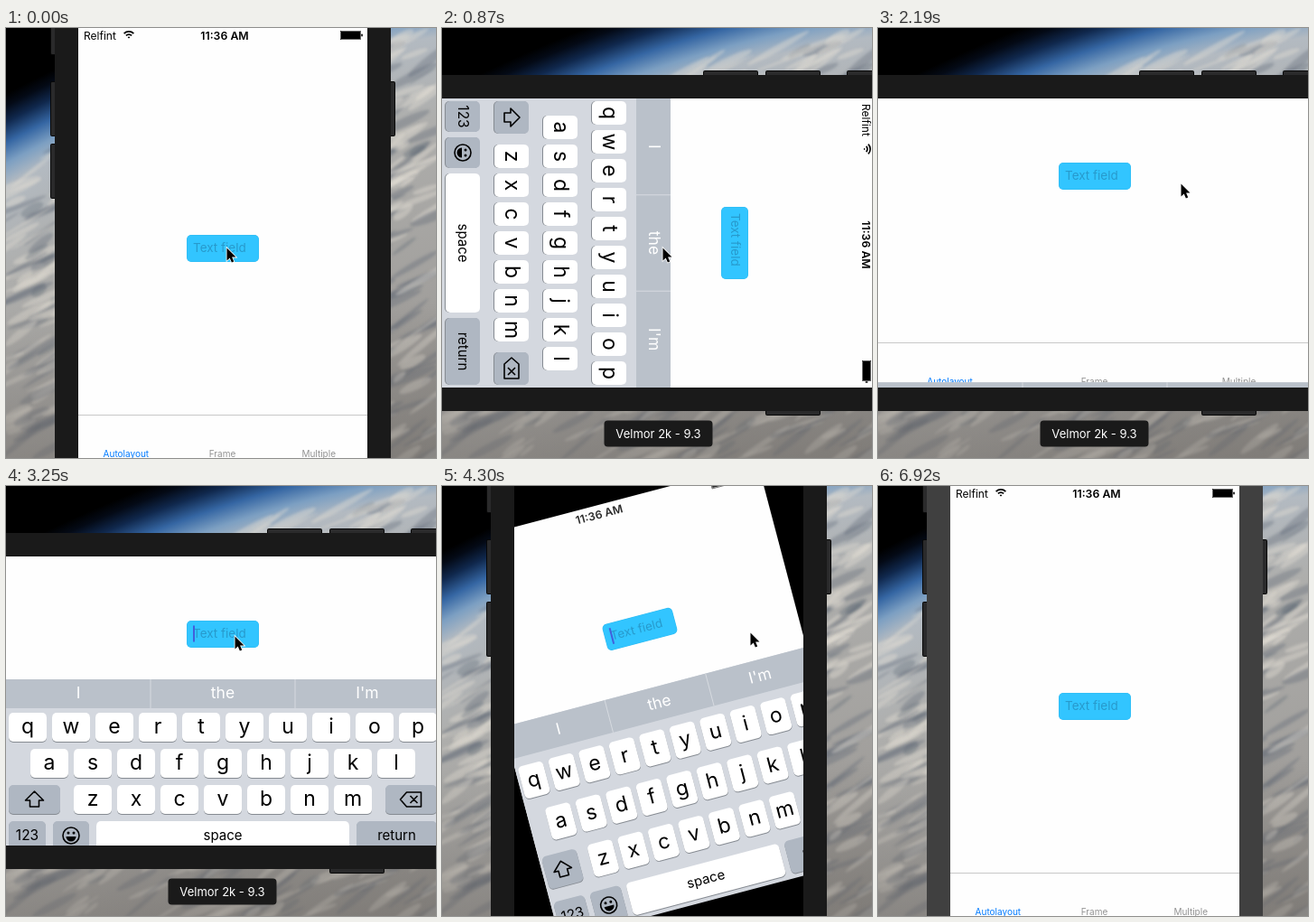
Animation, 476 px wide and 476 px high, one loop 7.02 s. Source, as an HTML page with a canvas:

```html
<!DOCTYPE html>
<html lang="en">
<head>
<meta charset="utf-8">
<title>Keyboard and rotation demo</title>
<style>
html, body { margin: 0; width: 100%; height: 100%; overflow: hidden; background: #000; }
canvas { display: block; width: 476px; height: 476px; }
</style>
</head>
<body>
<canvas id="stage" width="476" height="476"></canvas>
<script>
const SIZE = 476, LOOP = 7020;
const ctx = document.getElementById('stage').getContext('2d');
const lerp = (a, b, k) => a + (b - a) * k;
const clamp = x => Math.min(1, Math.max(0, x));
const ease = x => { x = clamp(x); return x * x * (3 - 2 * x); };

const bursts = [[180, 870, 9], [960, 1660, 9], [2190, 2810, 8], [2990, 3690, 9], [4040, 4390, 5],
  [4650, 4740, 2], [5180, 5360, 3], [5900, 6070, 3], [6240, 6330, 2]];
const updates = bursts.flatMap(([from, to, n]) =>
  Array.from({ length: n }, (_, i) => Math.floor(lerp(from, to, i / (n - 1)) / 10) * 10));
const lastUpdate = t => updates.reduce((last, u) => u <= t ? u : last, 0);

// Critically damped spring from 0 to 1.
const spring = t => { const w = Math.max(0, t) * 0.0182; return 1 - (1 + w) * Math.exp(-w); };
const keyboardShown = t => spring(t - 120) - spring(t - 1896) + spring(t - 2985) - spring(t - 4867);
const landscapeAmount = t => ease((t - 900) / 400) - ease((t - 4040) / 350);

// Pointer moves: [start, end, x, y]
const moves = [[1310, 1660, 335, 172], [2280, 2810, 253, 166], [3250, 3690, 341, 162],
  [5815, 6070, 342, 418], [6070, 6240, 364, 446]];
function pointerAt(t) {
  let x = 244, y = 243;
  for (const [from, to, toX, toY] of moves) {
    const k = ease((t - from) / (to - from));
    x = lerp(x, toX, k);
    y = lerp(y, toY, k);
  }
  return [x, y];
}

function rect(x, y, w, h, color, r = 0, g = ctx) {
  g.fillStyle = color;
  g.beginPath();
  g.roundRect(x, y, w, h, r);
  g.fill();
}
function text(str, x, y, size, color, align = 'center', weight = 400) {
  ctx.font = `${weight} ${size}px Inter, sans-serif`;
  ctx.textAlign = align;
  ctx.textBaseline = 'middle';
  ctx.fillStyle = color;
  ctx.fillText(str, x, y);
}
function trace(points, x, y) {
  ctx.beginPath();
  for (const [dx, dy] of points) ctx.lineTo(x + dx, y + dy);
  ctx.closePath();
}
function dot(x, y, r, end = 7) {
  ctx.beginPath();
  ctx.arc(x, y, r, 0, end);
  ctx.fill();
}
function at(x, y, angle, draw) {
  ctx.save();
  ctx.translate(x, y);
  ctx.rotate(angle);
  draw();
  ctx.restore();
}

// Planet edge running diagonally across the top left, clouds below it.
function makeWallpaper() {
  const canvas = document.createElement('canvas');
  canvas.width = canvas.height = SIZE;
  const g = canvas.getContext('2d');
  const cx = 670, cy = 1336, inner = 850, outer = 1430;
  const sky = g.createRadialGradient(cx, cy, inner, cx, cy, outer);
  [[850, '#8b8884'], [1050, '#a19f9c'], [1250, '#aeaeac'], [1340, '#b3bac1'], [1362, '#7c9fc2'],
    [1382, '#3566a3'], [1402, '#10284d'], [1418, '#040a16'], [1430, '#000']]
    .forEach(([r, color]) => sky.addColorStop((r - inner) / (outer - inner), color));
  rect(0, 0, SIZE, SIZE, sky, 0, g);
  let seed = 11;
  const random = () => (seed = seed * 16807 % 2147483647) / 2147483647;
  g.filter = 'blur(1.5px)';
  for (let i = 0; i < 650; i++) {
    const x = random() * SIZE, y = random() * SIZE;
    const long = 8 + random() * 32, thin = 1 + random() * 4.5, bright = random() < .58;
    if (Math.hypot(x - cx, y - cy) > 1352) continue;
    g.fillStyle = bright ? 'rgba(226,221,212,.42)' : 'rgba(84,95,110,.3)';
    g.beginPath();
    g.ellipse(x, y, long, thin, -.7 + random() * .4, 0, 7);
    g.fill();
  }
  g.filter = 'none';
  const haze = g.createLinearGradient(0, 300, 0, SIZE);
  haze.addColorStop(0, 'rgba(112,108,104,0)');
  haze.addColorStop(1, 'rgba(112,108,104,.5)');
  rect(0, 300, SIZE, 176, haze, 0, g);
  return canvas;
}
const wallpaper = makeWallpaper();

function key(x, y, w, h, label, size, special) {
  rect(x, y + 1, w, h, '#868b92', 5);
  rect(x, y, w, h, special ? '#afb7c2' : '#fff', 5);
  const cx = x + w / 2, cy = y + h / 2;
  if (typeof label === 'string') return text(label, cx, cy, size, '#000');
  ctx.strokeStyle = '#000';
  ctx.lineWidth = 1.6;
  ctx.lineJoin = 'round';
  label(cx, cy);
}
function shiftIcon(x, y) {
  trace([[0, -9], [10, 1], [5, 1], [5, 8], [-5, 8], [-5, 1], [-10, 1]], x, y);
  ctx.stroke();
}
function deleteIcon(x, y) {
  trace([[-12, 0], [-5, -8], [11, -8], [11, 8], [-5, 8]], x, y);
  ctx.moveTo(x - 1, y - 4); ctx.lineTo(x + 7, y + 4);
  ctx.moveTo(x + 7, y - 4); ctx.lineTo(x - 1, y + 4);
  ctx.stroke();
}
function smileIcon(x, y) {
  ctx.beginPath();
  ctx.arc(x, y, 9, 0, 7);
  ctx.stroke();
  ctx.fillStyle = '#000';
  dot(x - 3, y - 3, 1.5);
  dot(x + 3, y - 3, 1.5);
  dot(x, y + 1, 5.5, Math.PI);
}

// Every measure is mixed between portrait and landscape by k.
function drawKeyboard(top, width, height, k) {
  const mix = (a, b) => lerp(a, b, k);
  const pitch = width / 10, keyH = mix(38, 32), bar = mix(38, 32);
  const rowY = row => top + mix(49, 37) + row * mix(54, 40);
  rect(0, top, width, height + 1, '#d4d8df');
  rect(0, top, width, bar, '#bac1ca');
  ['I', 'the', "I'm"].forEach((word, i) => {
    text(word, width * (i + .5) / 3, top + bar / 2, 17.5, '#fff');
    if (i) rect(width * i / 3 - .5, top, 1, bar, '#d6dae0');
  });
  ['qwertyuiop', 'asdfghjkl', 'zxcvbnm'].forEach((letters, row) =>
    [...letters].forEach((c, i) =>
      key(3 + pitch * (i + [0, .5, 1.5][row]), rowY(row), pitch - 6, keyH, c, 23)));
  const side = mix(36, 57);
  key(3, rowY(2), side, keyH, shiftIcon, 0, true);
  key(width - 3 - side, rowY(2), side, keyH, deleteIcon, 0, true);
  key(3, rowY(3), mix(34, 41), keyH, '123', 15.5, true);
  key(mix(43, 52), rowY(3), mix(34, 40), keyH, smileIcon, 0, true);
  key(mix(83, 100), rowY(3), mix(154, 280), keyH, 'space', 15);
  key(mix(243, 388), rowY(3), mix(74, 89), keyH, 'return', 15, true);
}

function drawStatusBar(alpha) {
  ctx.globalAlpha = alpha;
  text('Relfint', 6, 11, 12, '#000', 'left');
  text('11:36 AM', 162, 11, 12.3, '#000', 'center', 600);
  ctx.strokeStyle = '#000';
  ctx.lineWidth = 1.7;
  for (const r of [1, 4.4, 7.6]) {
    ctx.beginPath();
    ctx.arc(56, 13.5, r, -Math.PI * .75, -Math.PI * .25);
    ctx.stroke();
  }
  ctx.lineWidth = .6;
  ctx.strokeRect(290.3, 5.3, 22.4, 9.4);
  rect(291, 6, 21, 8, '#000');
  rect(313.3, 8.5, 1.5, 3, '#000', 1);
  ctx.globalAlpha = 1;
}

function caretAlpha(t) {
  if (t >= 180 && t < 700 || t >= 2990 && t < 4650) return 1;
  return t >= 4650 && t < 4740 ? .5 : 0;
}

function drawApp(t, k) {
  const width = lerp(320, 480, k), height = lerp(480, 320, k), shown = keyboardShown(t);
  ctx.translate(-width / 2, -height / 2);
  rect(0, 0, width, height, '#fefefe');
  drawStatusBar(1 - k);

  const fieldX = width / 2 - 40, fieldY = lerp(231 - 90 * shown, 71, k);
  rect(fieldX, fieldY, 80, 30, '#2eb9f0', 5);
  rect(fieldX + .5, fieldY + .5, 79, 29, '#32c5ff', 4.5);
  text('Text field', fieldX + 7, fieldY + 15, 13.5, 'rgba(0,0,25,.22)', 'left');
  ctx.globalAlpha = caretAlpha(t);
  rect(fieldX + 7, fieldY + 5.5, 2, 18, '#4260dc');
  ctx.globalAlpha = 1;

  rect(0, height - 50, width, 1, '#c8c8c8');
  ['Autolayout', 'Frame', 'Multiple'].forEach((name, i) =>
    text(name, width * (i + .5) / 3 - .5, height - 6.5, 10, i ? '#929292' : '#007aff'));

  const keyboardH = lerp(253, 193, k);
  if (shown > .002) drawKeyboard(height - keyboardH * shown, width, keyboardH, k);
}

function drawDevice(color) {
  for (const [x, y, h] of [[-191, -300, 92], [-191, -179, 61], [-191, -110, 61], [184, -179, 61]]) {
    rect(x, y, 7, h, '#080808', 2);
    rect(x + 1, y + 1, 5, h - 2, '#2a2a2b', 1);
  }
  rect(-186, -400, 372, 800, color);
  rect(-160, -240, 320, 480, '#000');
}

function drawPointer(t) {
  if (t >= 6330) return;
  const [x, y] = pointerAt(t);
  trace([[0, 0], [0, 14], [3.2, 11], [5.4, 16], [7.7, 15], [5.6, 10.1], [10, 10.1]], x + .5, y + .5);
  ctx.lineJoin = 'miter';
  ctx.strokeStyle = '#fff';
  ctx.lineWidth = 1.6;
  ctx.stroke();
  ctx.fillStyle = '#000';
  ctx.fill();
}

function draw(now) {
  const time = now % LOOP, t = lastUpdate(time);
  const sideways = t >= 870 && t < 4040, k = landscapeAmount(t);
  const quarter = Math.PI / 2;
  ctx.drawImage(wallpaper, 0, 0);
  if (sideways) {
    rect(179.5, 434.5, 120, 29, '#1a1a1a', 4);
    text('Velmor 2k - 9.3', 239.5, 450, 13, '#fff');
  }
  at(240, 238, sideways ? quarter : 0, () => {
    drawDevice(time >= 6920 ? '#404040' : '#1a1a1a');
    ctx.beginPath();
    ctx.rect(-160, -240, 320, 480);
    ctx.clip();
    ctx.rotate(-quarter * k);
    drawApp(t, k);
  });
  drawPointer(t);
}

const start = performance.now();
function tick() {
  draw(performance.now() - start);
  requestAnimationFrame(tick);
}
tick();
</script>
</body>
</html>
```
